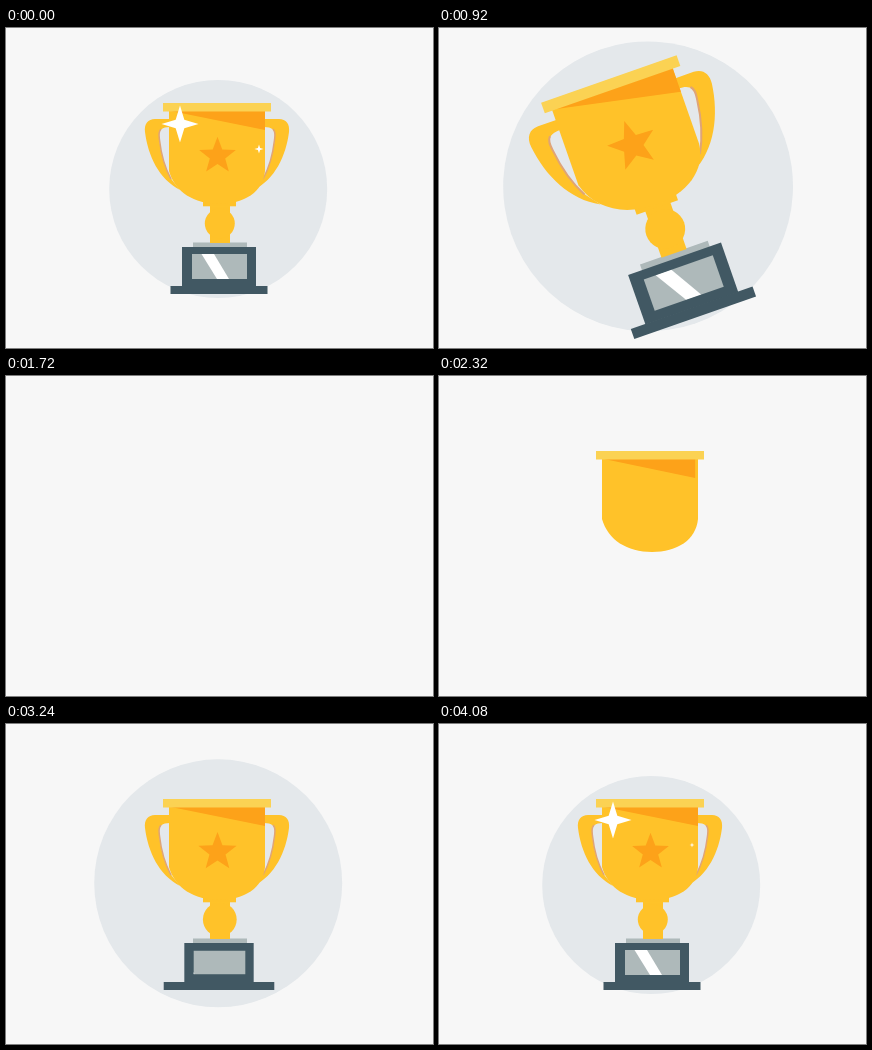
An HTML page with a canvas that plays this animation: 427 px wide and 320 px high, repeating every 4120 ms.

```html
<!DOCTYPE html>
<html lang="en">
<head>
<meta charset="utf-8">
<title>Trophy</title>
<style>
html, body { margin: 0; width: 100%; height: 100%; overflow: hidden; background: #f7f7f7; }
canvas { display: block; }
</style>
</head>
<body>
<canvas id="stage" width="427" height="320"></canvas>
<script>
const LOOP = 4120;
const GOLD = '#ffc229', ORANGE = '#fda219', RIM = '#fbd253';
const SLATE = '#415863', SILVER = '#aeb9ba', DISC = '#e4e8eb', WHITE = '#fff';
const ctx = document.getElementById('stage').getContext('2d');

// Eased interpolation through time, value pairs.
function key(t, ...k) {
  if (t <= k[0]) return k[1];
  for (let i = 2; i < k.length; i += 2) {
    if (t < k[i]) {
      const u = (t - k[i - 2]) / (k[i] - k[i - 2]);
      return k[i - 1] + (k[i + 1] - k[i - 1]) * u * u * (3 - 2 * u);
    }
  }
  return k[k.length - 1];
}

// Star polygon around the origin with its first point upwards.
function starPath(points, inner) {
  const path = new Path2D();
  for (let i = 0; i < points * 2; i++) {
    const a = i * Math.PI / points, r = i % 2 ? inner : 1;
    path.lineTo(r * Math.sin(a), -r * Math.cos(a));
  }
  path.closePath();
  return path;
}

const star = starPath(5, 0.42), glint = starPath(4, 0.33);
const cup = new Path2D('M163 83H259V143C257 164 238 176 213 176C188 176 169 164 163 143Z');
const handle = new Path2D('M164 91H149C142 91 138 96 139 104C142 128 153 151 174 162L166 152C158 139 154 122 153 108C153 102 156 99 164 99Z');
const innerEdge = new Path2D('M155 101C152 104 153 108 153.5 112C155 125 159 140 165 151');
const shade = new Path2D('M165 83H259V102Z');
const shine = new Path2D('M195.500 226H208L223 251H211Z');

function scaled(x, y, sx, sy, draw) {
  if (!sx || !sy) return;
  ctx.save();
  ctx.translate(x, y);
  ctx.scale(sx, sy);
  ctx.translate(-x, -y);
  draw();
  ctx.restore();
}

function fill(path, color) {
  ctx.fillStyle = color;
  ctx.fill(path);
}

function rect(x, y, w, h, color) {
  ctx.fillStyle = color;
  ctx.fillRect(x, y, w, h);
}

function disc(x, y, r, color) {
  ctx.fillStyle = color;
  ctx.beginPath();
  ctx.arc(x, y, r, 0, 7);
  ctx.fill();
}

function stamp(path, x, y, r, color) {
  if (r <= 0) return;
  ctx.save();
  ctx.translate(x, y);
  ctx.scale(r, r);
  fill(path, color);
  ctx.restore();
}

function drawHandle() {
  fill(handle, GOLD);
  ctx.strokeStyle = '#dfa477';
  ctx.lineWidth = 1.5;
  ctx.stroke(innerEdge);
}

function drawBase(t) {
  const wide = key(t, 2680, 0, 2960, 1.135, 3300, 0.92, 3700, 1);
  const foot = key(t, 3000, 0, 3240, 1.14, 3520, 0.95, 3800, 1);
  const pane = key(t, 3040, 0, 3300, 1.08, 3480, 1);
  const slide = key(t, 3240, -36, 3680, 0);
  scaled(214, 216, key(t, 2700, 0, 2900, 1), 1, () => rect(187, 214.5, 54, 5, SILVER));
  scaled(213, 238, wide, 1, () => rect(176, 219, 74, 39.5, SLATE));
  scaled(213, 262, foot, 1, () => rect(164.5, 258, 97, 8, SLATE));
  scaled(213.5, 238.5, pane, pane, () => {
    rect(186, 226, 55, 25, SILVER);
    ctx.beginPath();
    ctx.rect(186, 226, 55, 25);
    ctx.clip();
    ctx.translate(slide, 0);
    fill(shine, WHITE);
  });
}

function drawCup(t) {
  const grip = key(t, 2400, 0, 2640, 1.08, 2780, 1);
  const body = key(t, 1720, 0, 2060, 1.04, 2200, 1);
  const stem = key(t, 2700, 178, 3060, 215);
  scaled(167, 128, grip, grip, drawHandle);
  scaled(211, 128, -grip, grip, () => {
    // Mirrored copy, growing from the right side of the cup.
    ctx.translate(44 - 44 / (grip || 1), 0);
    drawHandle();
  });
  if (stem > 178) rect(204, 174, 20, stem - 174, GOLD);
  scaled(213.5, 175, key(t, 2600, 0, 2720, 1), 1, () => rect(197, 173, 33, 5.3, GOLD));
  const knob = key(t, 3000, 0, 3200, 1.15, 3360, 1);
  disc(213.8, 195.5, 15 * knob, GOLD);
  scaled(211, 129.5, body, body, () => fill(cup, GOLD));
  scaled(165, 83, key(t, 2140, 0, 2342, 1), 1, () => fill(shade, ORANGE));
  ctx.save();
  ctx.translate(key(t, 2040, -16, 2240, 0), key(t, 2040, -53, 2240, 0));
  scaled(211, 79, key(t, 1960, 0, 2100, 1), 1, () => rect(157, 75, 108, 8.5, RIM));
  ctx.restore();
  stamp(star, 211.5, 128, 19.3 * key(t, 3040, 0, 3300, 1.2, 3460, 1), ORANGE);
}

function drawGlints(t) {
  stamp(glint, 174, 96, key(t, 3680, 0, 3960, 18.500, 4200, 18.500, 4420, 0), WHITE);
  stamp(glint, 253, 121, key(t, 4000, 0, 4200, 7, 4440, 0), WHITE);
  stamp(glint, 220, 190, key(t, 3500, 0, 3680, 8, 3880, 0), WHITE);
}

function frame(now) {
  const clock = now % LOOP;
  const leaving = clock < 1400;
  const t = leaving ? clock + LOOP : clock;
  rect(0, 0, 427, 320, '#f7f7f7');
  ctx.save();
  if (leaving) {
    // Wind up, then spin away to nothing.
    const size = key(clock, 740, 1, 972, 1.376, 1357, 0);
    const turn = key(clock, 740, 0, 972, -22, 1357, 258);
    const shift = key(clock, 740, 0, 972, -4, 1080, 0);
    ctx.translate(210.3 + shift, 161.2 + shift / 2);
    ctx.rotate(turn * Math.PI / 180);
    ctx.scale(size, size);
    ctx.translate(-210.3, -161.2);
  }
  const halo = key(t, 2587, 0, 3120, 1.206, 3500, 0.92, 3800, 1);
  disc(212.2, 173.5 - 12.5 * halo, 109 * halo, DISC);
  drawBase(t);
  drawCup(t);
  drawGlints(t);
  ctx.restore();
  requestAnimationFrame(frame);
}
requestAnimationFrame(frame);
</script>
</body>
</html>
```
